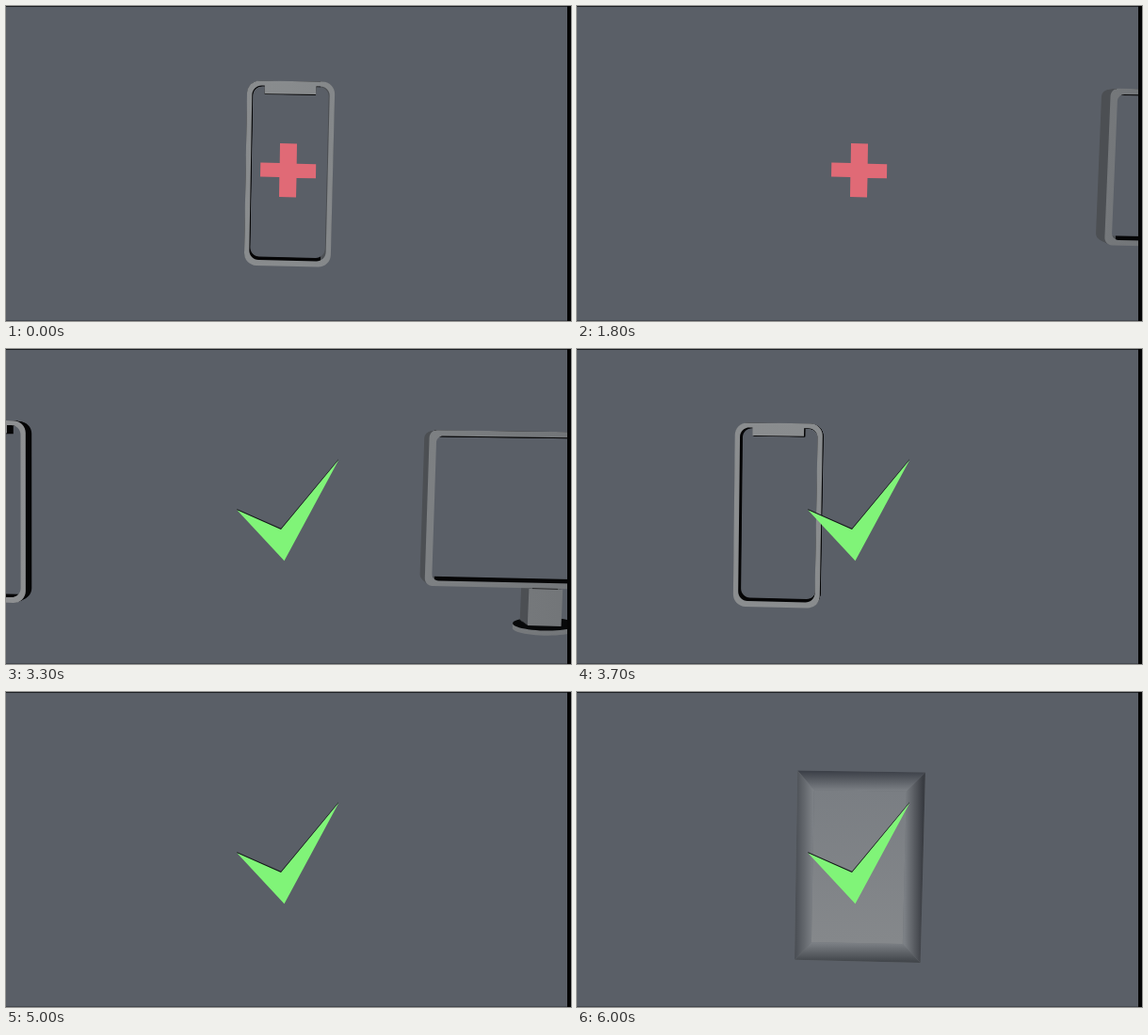
An HTML page with a canvas for the animation above (6.7 s loop, 600x335 px).

```html
<!DOCTYPE html>
<html lang="en">
<head>
<meta charset="utf-8">
<title>Devices</title>
<style>
html, body { margin: 0; width: 100%; height: 100%; overflow: hidden; background: #5a5f67; }
canvas { display: block; width: 600px; height: 335px; }
</style>
</head>
<body>
<canvas id="stage" width="600" height="335"></canvas>
<script>
const ctx = document.getElementById('stage').getContext('2d');
const LOOP = 6700, STEP = 100;
const EYE = { x: 300, y: 118 };
const WALL = '#4c4f53';

const metal = ctx.createLinearGradient(0, 0, 600, 0);
metal.addColorStop(0, '#8e9092');
metal.addColorStop(0.5, '#888b8d');
metal.addColorStop(1, '#727578');

// Progress from 0 to 1 with soft start and end
function ease(t, start, length) {
  const s = Math.min(1, Math.max(0, (t - start) / length));
  return s * s * (3 - 2 * s);
}

// The camera is slightly rolled and turned
function project(x, y, scale = 1) {
  const px = x - (0.021 + (x - 300) / 13000) * (y - 178);
  const py = 178 + (y - 178) * (1 + (x - 300) * 0.00005) + 0.018 * (x - 300);
  return [EYE.x + (px - EYE.x) * scale, EYE.y + (py - EYE.y) * scale];
}

function trace(points) {
  points.forEach(([x, y], i) => i ? ctx.lineTo(x, y) : ctx.moveTo(x, y));
  ctx.closePath();
}

function fill(points, color) {
  ctx.beginPath();
  trace(points);
  ctx.fillStyle = color;
  ctx.fill();
}

function arc(cx, cy, rx, ry, from, to, n) {
  return Array.from({ length: n + 1 }, (_, i) => {
    const a = from + (to - from) * i / n;
    return [cx + rx * Math.cos(a), cy + ry * Math.sin(a)];
  });
}

function roundRect([l, t, r, b, rad]) {
  if (!rad) return [[l, t], [r, t], [r, b], [l, b]];
  const q = Math.PI / 2;
  return [[r - rad, t + rad, -q], [r - rad, b - rad, 0], [l + rad, b - rad, q], [l + rad, t + rad, 2 * q]]
    .flatMap(([x, y, a]) => arc(x, y, rad, rad, a, a + q, 8));
}

// Extruded body: back layers first, then the front face
function solid({ outer, hole, notch, depth }, dx, dy) {
  const place = (box, k) => roundRect(box).map(([x, y]) => project(x + dx, y + dy, k));
  const left = (hole ? hole[0] : outer[0]) + dx;
  const right = (hole ? hole[2] : outer[2]) + dx;
  const side = ctx.createLinearGradient(left - 40, 0, right + 40, 0);
  const span = right - left + 80;
  const a = 41 / span, b = (span - 48) / span;
  const leftColor = left > 300 ? WALL : '#050506';
  const rightColor = right > 300 ? WALL : '#050506';
  [[0, leftColor], [a, leftColor], [a, '#050506'], [b, '#050506'], [b, rightColor], [1, rightColor]]
    .forEach(([at, c]) => side.addColorStop(at, c));

  for (let i = 6; i >= 0; i--) {
    const k = 1 - depth * i / 6;
    ctx.fillStyle = i ? side : metal;
    ctx.beginPath();
    trace(place(outer, k));
    if (hole) trace(place(hole, k));
    ctx.fill('evenodd');
    if (notch) fill(place(notch, k), i ? side : metal);
  }
}

const PHONE = {
  outer: [254.5, 80, 347, 276.7, 13],
  hole: [259.8, 85, 341.7, 270.7, 10],
  notch: [273, 84, 327.3, 93.7],
  depth: 0.023
};
const SCREEN = {
  outer: [170.5, 84.2, 430.5, 248.6, 8],
  hole: [178, 90.3, 425, 243, 7],
  depth: 0.036
};
const NECK = { outer: [282, 249.5, 318, 288], depth: 0.032 };

function monitor(dx) {
  const disc = (drop) => arc(300 + dx, 286 + drop, 34, 7, 0, Math.PI * 2, 48)
    .map(([x, y]) => project(x, y));
  for (let d = 5; d > 0; d--) fill(disc(d), metal);
  fill(disc(0), '#08090a');
  solid(NECK, dx, 0);
  solid(SCREEN, dx, 0);
}

function shade(p, q, from, to) {
  const g = ctx.createLinearGradient(p[0], p[1], q[0], q[1]);
  g.addColorStop(0, from);
  g.addColorStop(1, to);
  return g;
}

function panel(dy) {
  const corners = (l, t, r, b) => roundRect([l, t, r, b]).map(([x, y]) => project(x, y + dy));
  const out = corners(232.7, 84.5, 367.5, 286.3);
  const inn = corners(250.5, 105, 348, 267);
  fill(out, '#6a6e73');
  const mid = (p, q) => [(p[0] + q[0]) / 2, (p[1] + q[1]) / 2];
  ['#3c4048', '#393c42', '#43474c', '#4c5056'].forEach((dark, i) => {
    const j = (i + 1) % 4;
    const from = mid(out[i], out[j]), to = mid(inn[i], inn[j]);
    const end = i % 2 ? [to[0], from[1]] : [from[0], to[1]];
    fill([out[i], out[j], inn[j], inn[i]], shade(from, end, dark, '#7c8085'));
  });
  fill(inn, shade(inn[0], inn[3], '#7a7e83', '#85888b'));
}

function cross() {
  fill([[291, 146], [309, 146.4], [308.7, 167.8], [329.2, 168.3], [329, 183.3], [308.5, 183],
    [308, 203.5], [290, 203], [290.3, 182], [270, 181.5], [270.3, 166.5], [290.7, 167]], '#e06a76');
}

function check() {
  fill([[245, 170], [292, 190.8], [353, 117.3], [353, 118], [292, 193], [246, 172]], '#15191a');
  fill([[245.3, 171.2], [292, 192], [353.3, 118], [295.5, 225.3]], '#80f478');
}

function draw(t) {
  ctx.fillStyle = '#5a5f67';
  ctx.fillRect(0, 0, 600, 335);

  if (t < 1300) solid(PHONE, -402 * ease(t, 0, 1500), 0);
  if (t >= 1300 && t < 3700) {
    monitor(785 * (1 - ease(t, 1300, 1000) + ease(t, 2900, 1000)));
  }
  if (t >= 2800 && t < 4800) {
    solid(PHONE, -8 - 510 * (1 - ease(t, 2800, 1200)), 313 * ease(t, 3965, 1000));
  }
  if (t >= 5000) panel(-500 * (1 - ease(t, 5000, 1000)));

  if (t < 2500) cross(); else check();

  ctx.fillStyle = '#1d2024';
  ctx.fillRect(0, 0, 600, 1);
  ctx.fillStyle = '#44484f';
  ctx.fillRect(0, 334, 600, 1);
  ctx.fillStyle = '#050505';
  ctx.fillRect(596, 0, 4, 335);
}

const begin = performance.now();
function tick() {
  const t = (performance.now() - begin) % LOOP;
  draw(Math.floor(t / STEP) * STEP);
  requestAnimationFrame(tick);
}
tick();
</script>
</body>
</html>
```
